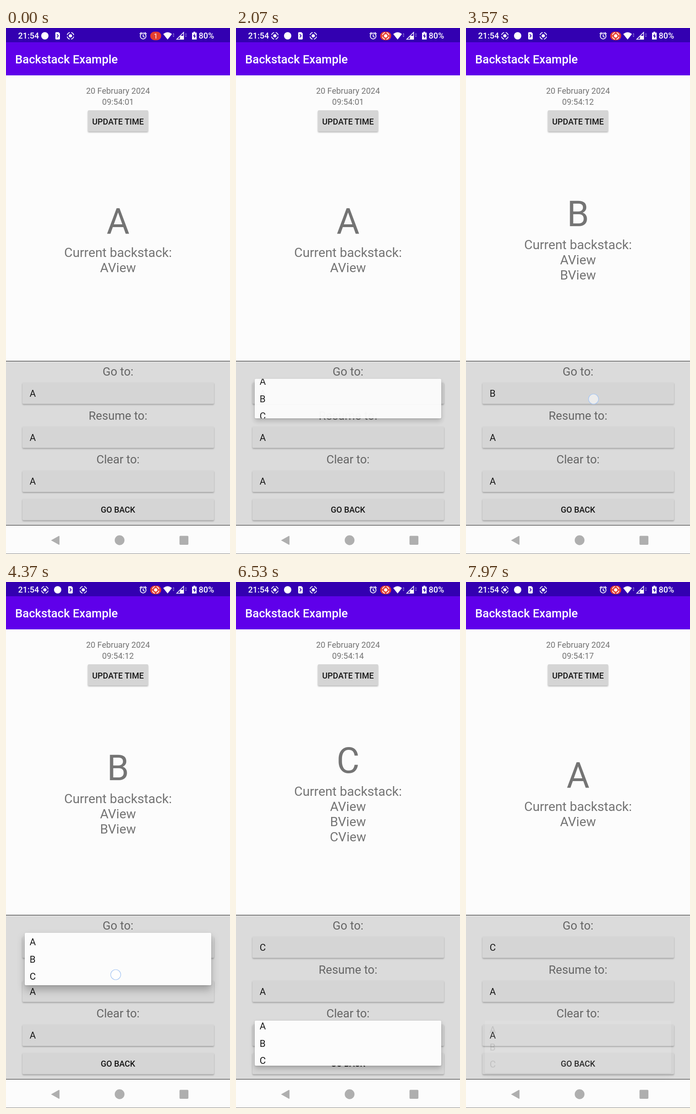
An HTML page that plays this animation: 490x1144 px, repeating every 8000 ms.

```html
<!DOCTYPE html>
<html lang="en">
<head>
<meta charset="utf-8">
<title>Backstack Example</title>
<style>
  html, body { margin: 0; width: 490px; height: 1144px; overflow: hidden; background: #fcfcfc; }
  svg { position: absolute; left: 0; top: 0; display: block; }
  text { font-family: Roboto, "Noto Sans", sans-serif; }
  .mid { text-anchor: middle; }
  .med { font-weight: 500; }
  .btn { fill: #d5d5d5; filter: drop-shadow(0 2px 1.5px rgba(0, 0, 0, .27)); }
  .dark { fill: #161616; }
  #popup { position: absolute; left: 41px; width: 408px; overflow: hidden; border-radius: 2.5px; background: #fcfcfc; }
</style>
</head>
<body>
<svg id="screen" width="490" height="1144" viewBox="0 0 490 1144">
  <defs>
    <g id="rec">
      <circle r="7.3" fill="none" stroke="#fff" stroke-width="1.7" stroke-dasharray="8.2 3.27" stroke-dashoffset="-1.6"/>
      <circle r="3.6" fill="#fff"/>
    </g>
    <clipPath id="fieldClip"><rect id="fieldBox" x="36" width="419" height="47" rx="2.5"/></clipPath>
  </defs>

  <rect width="490" height="32" fill="#3300b1"/>
  <rect y="31" width="490" height="72" fill="#5f00ea"/>
  <g fill="#fff">
    <text class="med" x="26.5" y="23" font-size="18">21:54</text>
    <use id="newIcon" href="#rec"/>
    <g id="icons">
      <circle cx="85" cy="17" r="8"/>
      <path d="M110 9h5l3 3v11q0 2-2 2h-6q-2 0-2-2v-12q0-2 2-2z"/>
      <path d="M111.5 13.5l3 3.5-3 3.5" fill="none" stroke="#3300b1" stroke-width="1.8"/>
      <use href="#rec" x="141" y="17"/>
    </g>
    <g fill="none" stroke="#fff" stroke-width="1.7">
      <circle cx="300" cy="17.5" r="6.3"/>
      <path d="M300 13.5v4.5l3 2M292.5 13l4-3.6M307.5 13l-4-3.6"/>
    </g>
    <rect x="315.5" y="8" width="24" height="18.5" rx="9" fill="#e43d30"/>
    <text id="count" class="mid" x="327.5" y="22.5" font-size="15">1</text>
    <use id="badgeIcon" href="#rec" x="327.5" y="17.2"/>
    <path d="M344 13.2q9.5-8 19 0l-9.5 11.8z"/>
    <path d="M388.5 9.5v15h-15z" fill="none" stroke="#fff" stroke-width="1.5"/>
    <path d="M388.5 17v7.5h-8v-7.5z"/>
    <path d="M364.5 14.5l2-3.5 2 3.5zm0 2l2 3.5 2-3.5zM391.5 14.5l2-3.5 2 3.5zm0 2l2 3.5 2-3.5z" fill="#8c78d4"/>
    <path d="M410 8h4v2h3v15h-10v-15h3z"/>
    <path d="M412.8 12l-3.8 6h2.6v5l3.8-6.2h-2.6z" fill="#3300b1"/>
    <text class="med" x="421.5" y="23" font-size="18">80%</text>
    <text class="med" x="20" y="77" font-size="25.7">Backstack Example</text>
  </g>

  <g class="mid" fill="#747474">
    <text x="245" y="142.5" font-size="18">20 February 2024</text>
    <text id="clock" x="245" y="166.5" font-size="18"></text>
    <g id="view">
      <text id="letter" x="245" y="447.5" font-size="77"></text>
      <text x="245" y="497.5" font-size="28.3">Current backstack:</text>
      <text class="stack" x="245" y="530.6" font-size="28.3">AView</text>
      <text class="stack" x="245" y="563.7" font-size="28.3">BView</text>
      <text class="stack" x="245" y="596.8" font-size="28.3">CView</text>
    </g>
  </g>
  <rect class="btn" x="179" y="179" width="132" height="46" rx="2.5"/>
  <text class="mid med dark" x="245" y="209.5" font-size="18">UPDATE TIME</text>

  <rect y="724" width="490" height="358" fill="#dbdbdb"/>
  <path d="M0 724.5h490M0 1081.5h490" stroke="#222"/>
  <g id="fields"></g>
  <rect class="btn" x="36" y="1024" width="419" height="46.5" rx="2.5"/>
  <text class="mid med dark" x="245" y="1053.5" font-size="18">GO BACK</text>
  <g clip-path="url(#fieldClip)"><circle id="fieldRipple"/></g>

  <g fill="#afafaf">
    <path d="M98.5 1114.2l17-9.4q1.5-.6 1.5 1v17q0 1.600-1.500 1z"/>
    <circle cx="248.500" cy="1114" r="10.700"/>
    <rect x="379.500" y="1104.500" width="19.500" height="19.500" rx="2"/>
    <rect y="1143" width="490" height="1" fill="#8a8a8a"/>
  </g>
</svg>

<div id="popup">
  <svg id="list" width="408" height="114">
    <clipPath id="rowClip"><rect id="rowBox" width="408" height="37.5"/></clipPath>
    <g clip-path="url(#rowClip)"><circle id="rowRipple"/></g>
    <g class="dark" font-size="20.6">
      <text x="10.700" y="27.300">A</text>
      <text x="10.700" y="64.800">B</text>
      <text x="10.700" y="102.300">C</text>
    </g>
  </svg>
</div>

<svg width="490" height="1144">
  <circle id="touch" r="11" fill="#fff" fill-opacity=".55" stroke="#a6c6f4" stroke-width="1.2"/>
</svg>

<script>
const LOOP = 8000, FULL = 114, UPDATE = 350;
const $ = id => document.getElementById(id);
const set = (el, attrs) => { for (const k in attrs) el.setAttribute(k, attrs[k]); };
const ramp = (t, from, to) => Math.min(1, Math.max(0, (t - from) / (to - from)));
const smooth = x => x * x * (3 - 2 * x);
const reveal = x => 1 - (1 - smooth(x)) ** 2;

// One entry per use of a dropdown: tap to open, tap to choose.
const picks = [
  { top: 771, open: 1730, at: [272, 803], choose: 2530, on: [252, 821], row: 1 },
  { top: 771, open: 3570, at: [279, 807], choose: 4370, on: [240, 854], row: 2 },
  { top: 962, open: 6170, at: [264, 988], choose: 7500, on: [243, 976], row: 0 }
];
const screens = [
  { from: 0, letter: "A", depth: 1, time: "09:54:01", goTo: "A" },
  { from: 2530 + UPDATE, letter: "B", depth: 2, time: "09:54:12", goTo: "B" },
  { from: 4370 + UPDATE, letter: "C", depth: 3, time: "09:54:14", goTo: "C" },
  { from: 7500 + UPDATE, letter: "A", depth: 1, time: "09:54:17", goTo: "C" }
];

$("fields").innerHTML = ["Go to:", "Resume to:", "Clear to:"].map((label, i) => {
  const y = 771 + i * 95.7;
  return `<text class="mid" x="245" y="${y - 15}" font-size="25.7" fill="#666">${label}</text>
    <rect class="btn" x="36" y="${y}" width="419" height="46.5" rx="2.5"/>
    <text class="dark value" x="51.700" y="${y + 31}" font-size="20.6">A</text>`;
}).join("");
const goValue = document.querySelector(".value");
const stack = document.querySelectorAll(".stack");

function drawStatus(t) {
  const slide = smooth(ramp(t, 100, 450)), grow = smooth(ramp(t, 200, 550));
  const recording = t >= 30;
  set($("icons"), { transform: `translate(${28 * slide} 0)` });
  set($("newIcon"), { transform: `translate(85 17) scale(${grow})`, opacity: grow });
  set($("count"), { opacity: recording ? 0 : 1 });
  set($("badgeIcon"), { opacity: recording ? 1 : 0 });
}

function drawScreen(t) {
  const s = screens.filter(v => t >= v.from).pop();
  $("clock").textContent = s.time;
  $("letter").textContent = s.letter;
  goValue.textContent = s.goTo;
  set($("view"), { transform: `translate(0 ${-16.5 * (s.depth - 1)})` });
  stack.forEach((line, i) => set(line, { opacity: i < s.depth ? 1 : 0 }));
}

function drawRipple(el, x, y, d, strength, fade) {
  const level = ramp(d, 50, 120) * (1 - ramp(d, fade, fade + 250));
  set(el, { cx: x, cy: y, r: 20 + 380 * smooth(ramp(d, 50, 330)), "fill-opacity": strength * level });
}

function drawPopup(p, t) {
  const d = t - p.open, c = t - p.choose;
  const k = reveal(ramp(d, 215, 465)), h = FULL * k;
  const alpha = ramp(d, 205, 347) * (1 - ramp(c, 350, 485));
  const top = p.top - 8, z = smooth(ramp(d, 250, 550));
  Object.assign($("popup").style, {
    top: top + "px", height: h + "px", opacity: alpha,
    boxShadow: `0 ${5 + 5 * z}px ${10 + 7 * z}px rgba(0,0,0,${.18 + .08 * z}), 0 1px 3px rgba(0,0,0,.15)`
  });
  $("list").style.top = (h - FULL) / 2 + "px";
  set($("fieldBox"), { y: p.top });
  drawRipple($("fieldRipple"), ...p.at, d, .07, 200);
  set($("rowBox"), { y: 1 + 37.5 * p.row });
  drawRipple($("rowRipple"), p.on[0] - 41, p.on[1] - top, c, .1, 200);
}

function drawTouch(p, t) {
  const pressed = start => t >= start && t < start + 110;
  const spot = pressed(p.open) ? p.at : pressed(p.choose) ? p.on : null;
  set($("touch"), { cx: spot ? spot[0] : 0, cy: spot ? spot[1] : 0, opacity: spot ? 1 : 0 });
}

function draw(t) {
  const p = picks.filter(v => t >= v.open).pop() || picks[0];
  drawStatus(t);
  drawScreen(t);
  drawPopup(p, t);
  drawTouch(p, t);
}

const start = performance.now();
function tick() {
  draw((performance.now() - start) % LOOP);
  requestAnimationFrame(tick);
}
tick();
</script>
</body>
</html>
```
